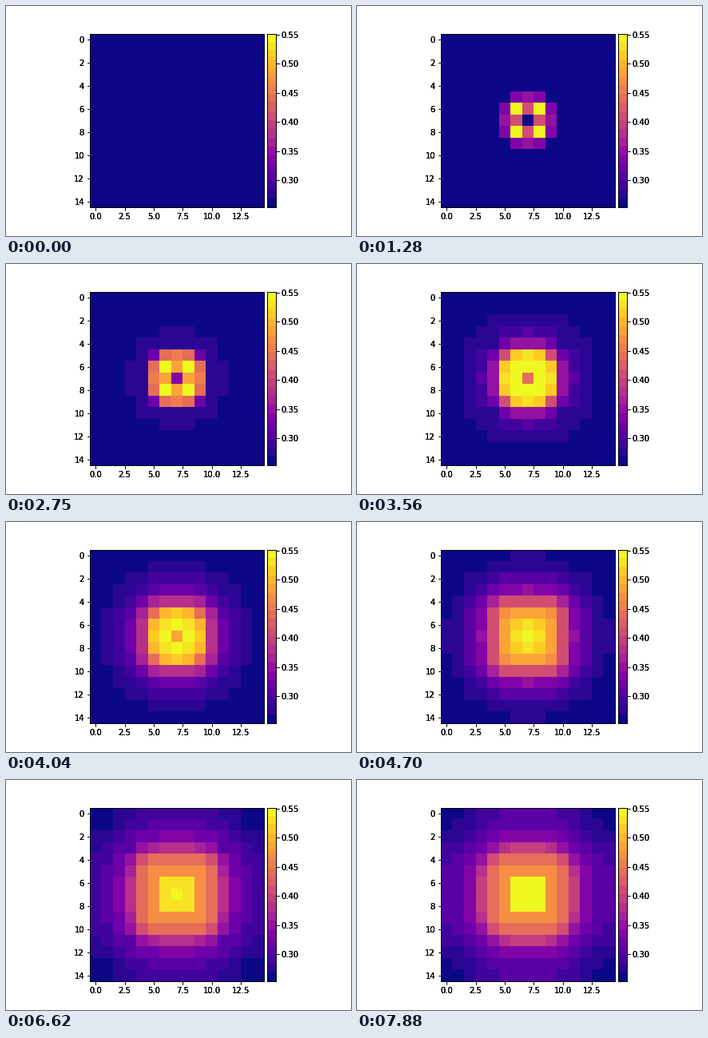
Animation, 432 px wide and 288 px high, one loop 8 s. Source, as a matplotlib script:

```python
import numpy as np
import matplotlib.pyplot as plt
from matplotlib.animation import FuncAnimation

W, H, DPI = 432, 288, 72
N, MID, LEVELS = 15, 7, 20
LOOP, STEP = 8000, 40
LEFT, TOP, SIDE = 105.1, 34.56, 217.9
BAR_X, BAR_W = 326.6, 10.9
V_MIN, V_MAX = 0.2525, 0.552

# Colour level on the axis and at the corner of each square ring, centre outwards.
STAGES = np.array([
    [(0, 0), (10, 19), (5.4, 0), (.3, .3), (0, 0), (0, 0), (0, 0), (0, 0)],
    [(5, 5), (15, 19), (13, 4), (1, 1), (.8, -2), (0, 0), (0, 0), (0, 0)],
    [(12, 12), (19.4, 19), (17.6, 10), (5.6, 1), (2.55, .55), (.9, 0), (.35, 0), (.2, 0)],
    [(19, 19), (18, 17.4), (15.4, 14), (10.45, 7.4), (5.6, 2), (2.9, .6), (1, -.3), (.55, -.5)],
    [(19, 19), (17, 17), (14.3, 14), (12.4, 9.6), (7.2, 3), (4.3, 2), (2.8, 0), (1.3, -.4)],
    [(19, 19), (19, 19), (14.4, 14), (12.4, 10), (9.4, 4), (5.1, 2), (3.4, .6), (3, -.6)],
])

# Growth comes in bursts: time in ms against stage position.
TIMES = [1280, 1700, 2150, 2750, 2840, 2930, 3020, 3560, 3740, 3830, 4310, 4520,
         4700, 4790, 5300, 5450, 5600, 5840, 6350, 6710, 7430, 7730, 7880]
PLACES = [0, .3, .3, 1, 1, 1.12, 1.12, 2, 2.15, 2.23, 2.7, 2.83,
          3, 3, 3.7, 3.75, 4, 4, 4.2, 4.55, 4.65, 4.95, 5]

row, col = np.abs(np.indices((N, N)) - MID)
ring = np.maximum(row, col)
along = np.minimum(row, col) / np.maximum(ring, 1)
falloff = along ** np.where(ring < 4, 3, 2)


def heat(t):
    if t < TIMES[0]:
        return np.zeros((N, N))
    place = np.interp(t, TIMES, PLACES)
    i = min(int(place), len(STAGES) - 2)
    rings = STAGES[i] + (STAGES[i + 1] - STAGES[i]) * (place - i)
    axis, corner = rings[ring, 0], rings[ring, 1]
    return np.clip(np.round(axis + (corner - axis) * falloff), 0, LEVELS - 1)


fig = plt.figure(figsize=(W / DPI, H / DPI), dpi=DPI, facecolor="white")
cmap = plt.get_cmap("plasma", LEVELS)
plt.rcParams["font.family"] = "DejaVu Sans"


def add_axes(x, width):
    ax = fig.add_axes([x / W, 1 - (TOP + SIDE) / H, width / W, SIDE / H])
    ax.patch.set_visible(False)
    return ax


def add_map_axes():
    ax = add_axes(LEFT, SIDE)
    ax.set(xlim=(-.5, N - .5), ylim=(N - .5, -.5))
    ax.set_xticks(np.arange(0, 13, 2.5))
    ax.set_yticks(range(0, N, 2))
    return ax


def add_bar_axes():
    ax = add_axes(BAR_X, BAR_W)
    ax.set(xlim=(0, 1), ylim=(V_MIN, V_MAX), xticks=[])
    ax.set_yticks(np.arange(.3, .56, .05))
    ax.yaxis.set_major_formatter("{x:.2f}")
    ax.yaxis.tick_right()
    return ax


image = add_map_axes().imshow(heat(0), cmap=cmap, vmin=0, vmax=LEVELS - 1,
                              interpolation="nearest", aspect="auto")
add_bar_axes().imshow(np.arange(LEVELS)[:, None], cmap=cmap, origin="lower",
                      extent=(0, 1, V_MIN, V_MAX), aspect="auto",
                      interpolation="nearest")
# Overprinting makes the labels and frames heavier.
for _ in range(2):
    add_map_axes()
    add_bar_axes()


def update(frame):
    image.set_data(heat(frame * STEP + 30))
    return [image]


anim = FuncAnimation(fig, update, frames=LOOP // STEP, interval=STEP,
                     repeat=True, repeat_delay=0)
plt.show()
```
